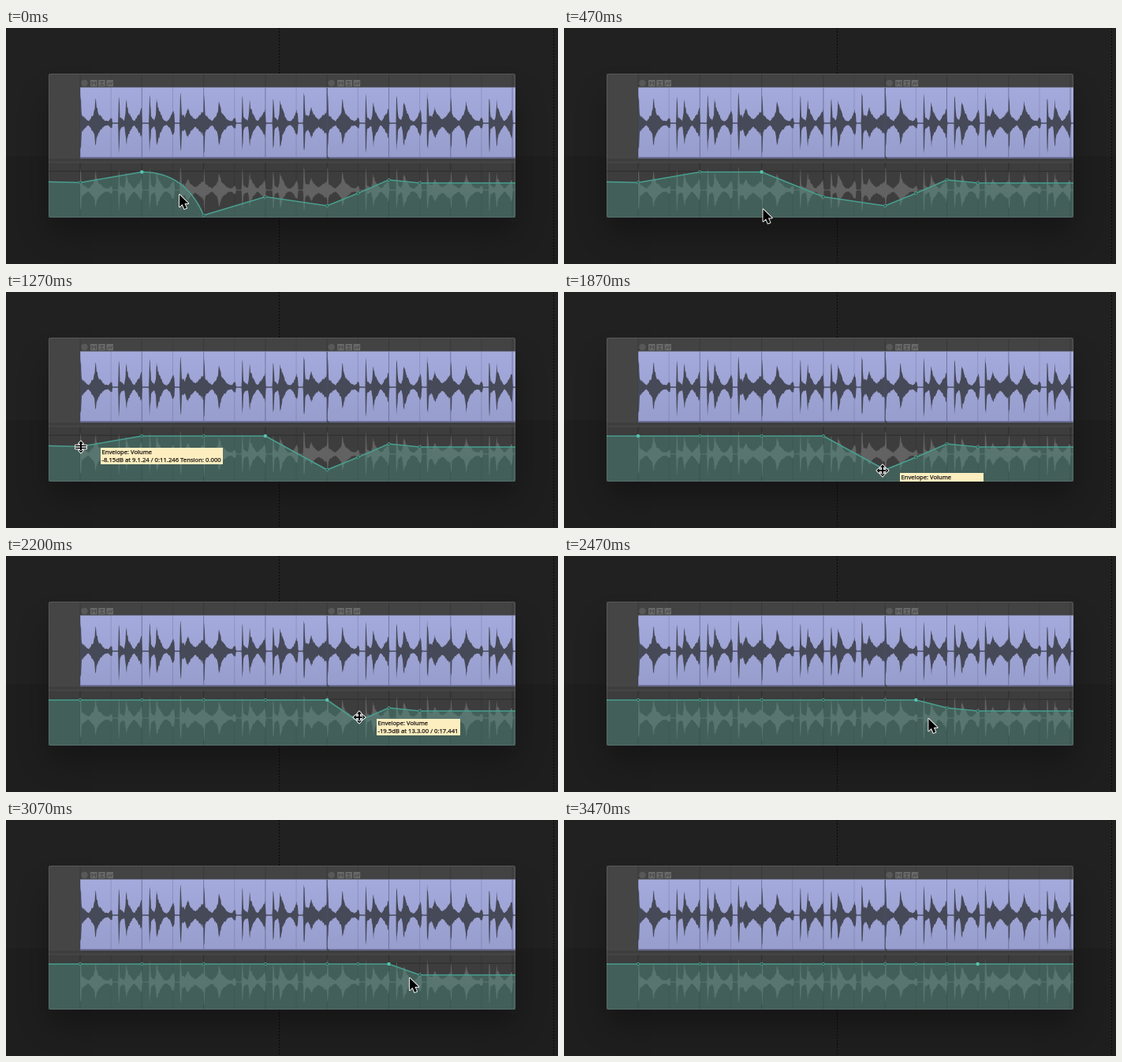
Write an HTML page with a canvas that moves like this. It is 700 px wide and 300 px high and loops after 4.53 s.

```html
<!DOCTYPE html>
<html lang="en">
<head>
<meta charset="utf-8">
<title>Volume envelope</title>
<style>
  html, body { margin: 0; width: 100%; height: 100%; overflow: hidden; background: #212121; }
  canvas { display: block; width: 700px; height: 300px; }
</style>
</head>
<body>
<canvas id="stage"></canvas>
<script>
const LOOP = 4530, TICK = 200 / 3;
const L = 54, T = 58, R = 646, B = 241, X0 = 94, GRID = 39.15, BAR = GRID * 2;
const ZERO = 183;
const canvas = document.getElementById('stage');
const scale = window.devicePixelRatio || 1;
canvas.width = 700 * scale;
canvas.height = 300 * scale;
const c = canvas.getContext('2d');
c.scale(scale, scale);

// Loudness of one drum loop: offset, half height
const BEAT = [
  0,37, 1,36, 1.8,12, 4,9, 9,4, 11,3, 14,8, 17,12, 18.5,19, 19.5,33, 21,23, 23,14, 27,9, 31,4,
  36,3, 38.5,7, 40.5,7, 41,0.8, 48.3,0.8, 48.8,38, 49.6,36, 50.5,9, 53,6, 56,4, 57.5,14,
  58.5,32, 60,20, 62,14, 65,8, 67,4, 69,3, 72,8, 75,13, 78,20, 79,0.8, 87.3,0.8, 87.8,38,
  88.6,34, 90,9, 94,4, 96,12, 97,33, 99,22, 102,13, 106,4, 110,2.5, 114,7, 118,18, 119.5,12,
  120,0.8, 126.3,0.8, 126.8,38, 128,34, 129,12, 133,9, 136.5,21, 139,14, 142,9, 146,5,
  150,9, 154,14, 156.6,16
];

// Envelope nodes: grid step, level, tick at which the node is reset
const NODES = [
  [0, 196.5, 22], [2, 183, 0], [4, 238, 6], [6, 214.5, 14],
  [8, 226, 30], [9, 210, 36], [10, 193, 44], [11, 197, 50]
].map(([step, y, reset]) => ({ x: X0 + step * GRID, y, reset }));

// Pointer path: tick, x, y, shape (arrow, node, segment), tooltip offset
const PATH = [
  [0, 220, 212, 'a'], [3, 245, 232, 'a'], [4, 246, 235, 'n'], [6, 247, 232, 'a'],
  [8, 258, 229, 'a'], [10, 316, 219, 'a'], [11, 325.5, 215.5, 's'], [12, 327, 215, 'n', 21, 1],
  [14, 326, 214, 'a'], [16, 187, 205, 'a'], [18, 102, 197, 's'], [19, 95, 197, 's', 25.2, 1],
  [20, 94, 197, 'n'], [22, 96, 198, 'a'], [24, 404, 228, 'a'], [25, 405, 234, 'a'],
  [27, 405, 229, 'n'], [28, 404, 227, 'n', 22, 3], [30, 407, 226, 'a'], [32, 436, 211, 'a'],
  [33, 448, 205, 'n', 22, 2], [34, 447, 207, 'n'], [36, 450, 212, 'a'], [39, 487, 197, 'a'],
  [40, 493, 194, 's', 21, 1], [41, 489, 194, 's'], [42, 486, 193, 'n'], [44, 488, 195, 'a'],
  [46, 512, 201, 'a'], [47, 521, 198, 's'], [48, 525, 197, 'n'], [50, 526, 203, 'a'],
  [51, 534, 221, 'a'], [52, 0, 0, '']
];

// Decibels below zero by height
const LEVELS = [183, 0, 193.716, 7, 195.69, 8.15, 210, 19.5, 214.5, 23.8, 226, 38.6, 240, 72];

function lookup(list, v) {
  let i = 2;
  while (i < list.length - 2 && list[i] < v) i += 2;
  const u = (v - list[i - 2]) / (list[i] - list[i - 2]);
  return list[i - 1] + (list[i + 1] - list[i - 1]) * u;
}

function box(x, y, w, h, color) {
  c.fillStyle = color;
  c.fillRect(x, y, w, h);
}

function noise(n) {
  const s = Math.sin(n * 12.9898) * 43758.5453;
  return s - Math.floor(s);
}

function wavePath(cy, gain) {
  const path = new Path2D();
  const amp = (x, seed) => {
    const off = (x - X0) % (BAR * 2);
    return Math.max(0.4, lookup(BEAT, off) * gain * (0.72 + 0.28 * noise(off * 2 + seed)));
  };
  path.moveTo(X0, cy);
  for (let x = X0; x <= R; x += 0.5) path.lineTo(x, cy - amp(x, 1));
  for (let x = R; x >= X0; x -= 0.5) path.lineTo(x, cy + amp(x, 7));
  path.closePath();
  return path;
}
const clipWave = wavePath(121, 1.06);
const laneWave = wavePath(206, 0.8);

const clipFill = c.createLinearGradient(0, 76, 0, 165);
clipFill.addColorStop(0, '#a4aadc');
clipFill.addColorStop(1, '#979dcc');

function backdrop() {
  box(0, 0, 700, 300, '#212121');
  box(0, 163, 700, 137, '#1e1e1e');
  c.strokeStyle = '#080808';
  c.lineWidth = 1;
  c.setLineDash([2, 2]);
  c.beginPath();
  for (const x of [346.5, 694.5]) { c.moveTo(x, 0); c.lineTo(x, 300); }
  c.stroke();
  c.setLineDash([]);
  c.save();
  c.shadowColor = 'rgba(0,0,0,.3)';
  c.shadowBlur = 36 * scale;
  c.shadowOffsetY = 18 * scale;
  box(L, T + 12, R - L, B - T - 12, '#404040');
  c.restore();
}

function icons(x) {
  c.fillStyle = '#585858';
  c.beginPath();
  c.arc(x + 5.5, 70, 4.3, 0, 7);
  c.fill();
  for (let i = 0; i < 3; i++) box(x + 13 + i * 10.2, 66, 8.6, 8.3, '#686868');
  c.strokeStyle = '#444';
  c.lineWidth = 0.9;
  c.stroke(new Path2D(`M${x + 15} 73v-5l2.3 3 2.3-3v5M${x + 25} 68.5h5M${x + 27.5} 68.5v4M${x + 25} 72.5h5M${x + 35} 73l2-4 2 3 2-4`));
}

function gridLines(top, bottom, weak, strong) {
  for (let i = 0; i < 15; i++)
    box(X0 + i * GRID - 0.5, top, 1, bottom - top, i % 2 ? weak : strong);
}

function track() {
  box(L, T, R - L, B - T, '#404040');
  box(L, T, R - L, 18, '#434343');
  box(L, T, X0 - L, 112, '#454545');
  gridLines(T + 1, 76, 'rgba(0,0,0,.08)', 'rgba(0,0,0,.16)');
  icons(X0);
  icons(X0 + BAR * 4);

  box(X0, 75.5, R - X0, 90.5, clipFill);
  gridLines(76, 165, 'rgba(40,42,70,.16)', 'rgba(40,42,70,.38)');
  c.fillStyle = '#464957';
  c.fill(clipWave);
  box(X0, 164, R - X0, 2, '#666a91');
  box(X0 + BAR * 4 - 0.5, 76, 1, 90, '#4c4f6c');
  c.fillStyle = '#464957';
  c.fill(new Path2D(`M${X0 + BAR * 4} 162l3 4h-3z`));

  box(L, 166, R - L, 4.5, '#3e3e3e');
  box(L, 170.5, R - L, 1, '#505050');
  box(L, 171.5, R - L, B - 171.5, '#3d3d3d');
  gridLines(171.5, B, 'rgba(0,0,0,.12)', 'rgba(0,0,0,.26)');
  box(L, 181.7, R - L, 1, '#2b2b2b');
  c.fillStyle = '#626262';
  c.fill(laneWave);
}

function envelope(k, pts) {
  const line = new Path2D();
  const last = pts[pts.length - 1];
  line.moveTo(L, k < 22 ? 195.5 : ZERO);
  pts.forEach((p, i) => {
    if (i === 2 && k < p.reset) line.quadraticCurveTo(227, ZERO, p.x, p.y);
    else line.lineTo(p.x, p.y);
  });
  line.lineTo(R, last.y);

  const area = new Path2D(line);
  area.lineTo(R, B);
  area.lineTo(L, B);
  area.closePath();
  c.fillStyle = 'rgba(76,146,130,.4)';
  c.fill(area);
  c.strokeStyle = '#489f90';
  c.lineWidth = 1.6;
  c.stroke(line);

  const done = pts.filter(p => p.reset <= k);
  const picked = done.reduce((a, p) => p.reset > a.reset ? p : a);
  for (const p of pts) {
    const on = p === picked;
    c.beginPath();
    c.arc(p.x, p.y, on ? 2.2 : 1.7, 0, 7);
    c.fillStyle = on ? '#55c2ad' : '#34504a';
    c.fill();
    if (on) continue;
    c.strokeStyle = '#4a9d8d';
    c.lineWidth = 0.9;
    c.stroke();
  }
}

function levelAt(x, pts) {
  const i = pts.findIndex(p => p.x >= x);
  if (i < 1) return (i ? pts[pts.length - 1] : pts[0]).y;
  const a = pts[i - 1], b = pts[i];
  return a.y + (b.y - a.y) * (x - a.x) / (b.x - a.x);
}

function reading(x, y) {
  const bars = 8 + (x - X0) / BAR;
  const ticks = Math.round(bars * 400);
  const bar = Math.floor(ticks / 400) + 1;
  const beat = Math.floor(ticks % 400 / 100) + 1;
  const part = String(ticks % 100).padStart(2, '0');
  const sec = Math.floor(bars * 240 / 172 * 1000) / 1000;
  return `-${lookup(LEVELS, y).toPrecision(3)}dB at ${bar}.${beat}.${part} / 0:${sec.toFixed(3)}`;
}

function tooltip(x, y, text) {
  const font = size => `${size}px "Noto Sans", "Open Sans", sans-serif`;
  c.save();
  c.beginPath();
  c.rect(L, T, R - L, B - T);
  c.clip();
  c.font = font(7.7);
  const w = Math.round(c.measureText(text).width + 4);
  box(x, y, w, 21, '#fdeec0');
  c.fillStyle = c.strokeStyle = '#1c1a16';
  c.lineWidth = 0.25;
  const write = (s, ty) => { c.fillText(s, x + 1.5, ty); c.strokeText(s, x + 1.5, ty); };
  write(text, y + 17.7);
  c.font = font(7.6);
  write('Envelope: Volume', y + 8);
  c.restore();
}

const ARROW = new Path2D('M0 0V15.2L3.6 12L6.2 18L9 16.8L6.4 11H11.2Z');
const HEADS = 'M0-7.5L3-4.2H-3ZM0 7.5L3 4.2H-3Z';
const SIDES = 'M-7.5 0L-4.2-3V3ZM7.5 0L4.2-3V3Z';
const CROSS = new Path2D(HEADS + SIDES + 'M-1-5H1V5H-1ZM-5-1H5V1H-5Z');
const SPLIT = new Path2D(HEADS + 'M-1-5H1V5H-1ZM-7-2.3H7V-.8H-7ZM-7 .8H7V2.3H-7Z');
const SIGNS = { a: ARROW, n: CROSS, s: SPLIT };

function pointer(x, y, shape) {
  c.save();
  c.translate(x, y);
  c.lineJoin = 'round';
  c.strokeStyle = '#f4f4f4';
  c.lineWidth = 1.9;
  c.stroke(SIGNS[shape]);
  c.fillStyle = '#000';
  c.fill(SIGNS[shape]);
  c.restore();
}

function hand(k, pts) {
  let i = PATH.length - 1;
  while (PATH[i][0] > k) i--;
  const [t0, ax, ay, shape, dx = 21.5, dy = 2] = PATH[i];
  if (!shape) return;
  const [t1, bx, by, next] = PATH[i + 1];
  const u = next ? (k - t0) / (t1 - t0) : 0;
  const x = ax + (bx - ax) * u, y = ay + (by - ay) * u;
  const tip = text => tooltip(Math.round(x + dx), Math.round(y + dy), text);
  if (shape === 'n') {
    const p = pts.reduce((a, q) => Math.abs(q.x - x) < Math.abs(a.x - x) ? q : a);
    tip(reading(p.x, p.y));
  } else if (shape === 's') {
    const hx = x + dx - 21.5;
    tip(reading(hx, levelAt(hx, pts)) + ' Tension: 0.000');
  }
  pointer(x, y, shape);
}

function draw(k) {
  const pts = NODES.map(n => ({ x: n.x, y: k >= n.reset ? ZERO : n.y, reset: n.reset }));
  backdrop();
  c.save();
  c.beginPath();
  c.roundRect(L, T, R - L, B - T, 3);
  c.clip();
  track();
  envelope(k, pts);
  c.beginPath();
  c.roundRect(L, T, R - L, B - T, 3);
  c.strokeStyle = 'rgba(255,255,255,.1)';
  c.lineWidth = 2;
  c.stroke();
  c.restore();
  hand(k, pts);
}

let shown = -1;
const start = performance.now();
function frame(now) {
  const t = Math.max(0, now - start) % LOOP;
  const k = Math.min(52, Math.floor(t / TICK + 0.05));
  if (k !== shown) draw(shown = k);
  requestAnimationFrame(frame);
}
draw(0);
requestAnimationFrame(frame);
</script>
</body>
</html>
```
